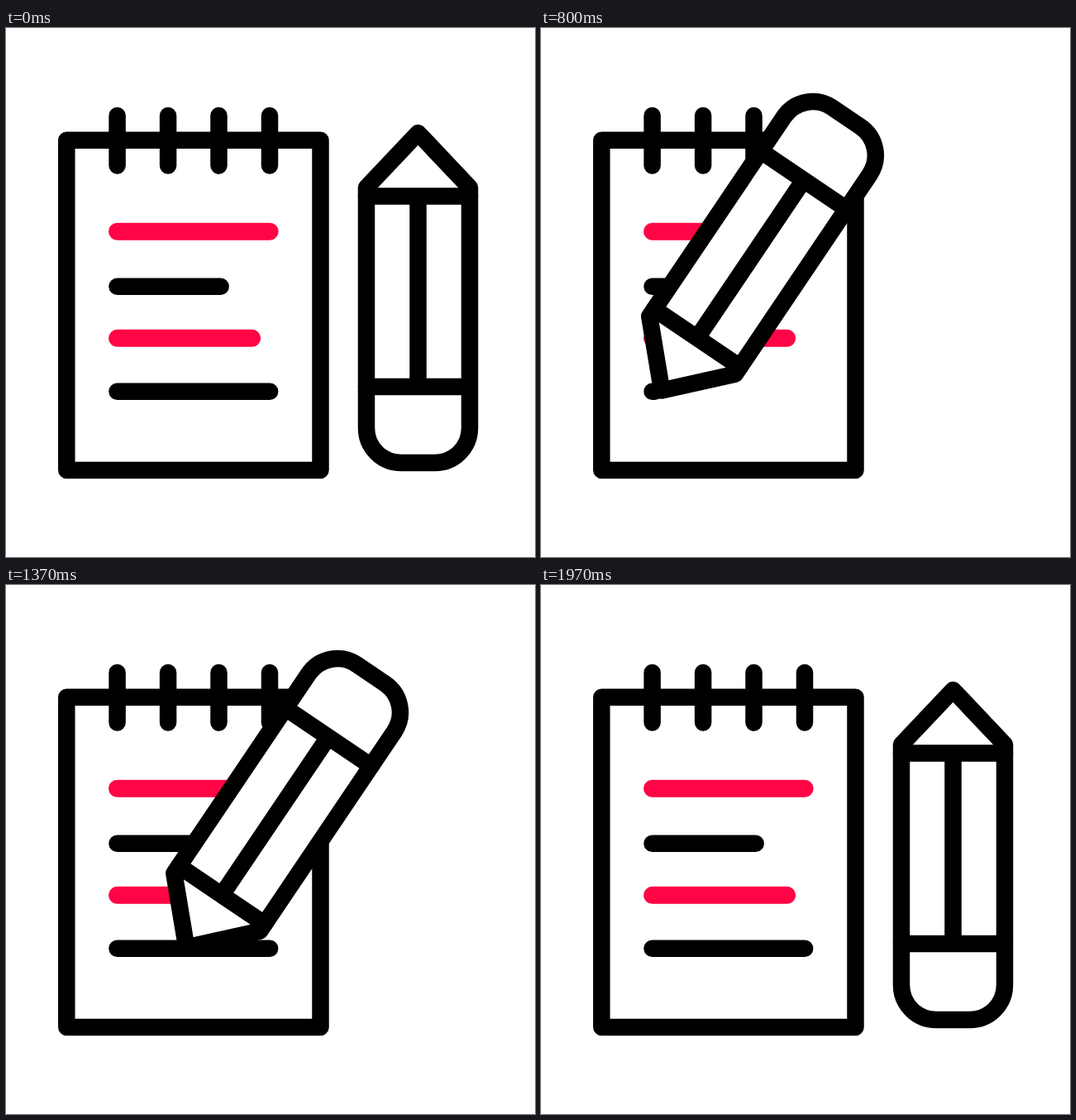
Write an HTML page that moves like this. It is 640 px wide and 640 px high and loops after 2.5 s.

```html
<!DOCTYPE html>
<html lang="en">
<head>
<meta charset="utf-8">
<title>Notepad and pencil</title>
<style>
  html, body { margin: 0; width: 100%; height: 100%; overflow: hidden; background: #fff; }
  svg { display: block; width: 100%; height: 100%; }
  path { fill: none; stroke: #000; stroke-width: 20.5; stroke-linecap: round; stroke-linejoin: round; }
  .red { stroke: #ff0546; stroke-width: 21; }
  .solid { fill: #fff; }
</style>
</head>
<body>
<svg viewBox="0 0 640 640">
  <path class="solid" d="M73.3 135.8H380.5V535H73.3Z"/>
  <path d="M134.6 106V166.5M196.1 106V166.5M257.5 106V166.5M319 106V166.5"/>
  <path class="red" d="M134.5 246.2H319.2M134.5 375.3H297.7"/>
  <path d="M134.5 312.7H259.7"/>
  <path id="line"/>
  <g id="pencil">
    <path class="solid" d="M-62.5 -133L0 -199L62.5 -133V158A42 42 0 0 1 20.5 200H-20.5A42 42 0 0 1 -62.5 158Z"/>
    <path d="M-62.5 -122.5H62.5M-62.5 108H62.5M0 -122.5V108"/>
  </g>
</svg>
<script>
  const LOOP = 2500, REST = 59, TURN = -146;
  const home = { x: 498.5, y: 326 }, page = { x: 253, y: 273.5 }, reach = 113;
  const line = document.getElementById('line');
  const pencil = document.getElementById('pencil');

  const span = (n, from, to) => Math.min(1, Math.max(0, (n - from) / (to - from)));
  const smooth = t => t * t * (3 - 2 * t);

  // Bezier easing with flat ends, handles at a and b
  function ease(t, a, b) {
    let lo = 0, hi = 1;
    for (let i = 0; i < 30; i++) {
      const s = (lo + hi) / 2, r = 1 - s;
      if (3 * r * r * s * a + 3 * r * s * s * b + s * s * s < t) lo = s; else hi = s;
    }
    return smooth(lo);
  }

  // n counts steps of 1/30 s
  function draw(n) {
    if (n >= REST) n = 0;
    const arrive = span(n, 9, 21), leave = span(n, 48.2, REST);
    const there = ease(arrive, .3, .47) - ease(leave, .5, .79);
    const write = smooth(span(n, 22.3, 36.6)) - smooth(span(n, 36.6, 48.2));
    const x = home.x + (page.x - home.x) * there + reach * write;
    const y = home.y + (page.y - home.y) * there;
    pencil.setAttribute('transform', `translate(${x} ${y}) rotate(${TURN * (arrive - leave)})`);

    const erased = smooth(span(n, 12.3, 25));
    const written = 1 - (1 - span(n, 25, 35)) ** 1.5;
    const length = 184.7 * (1 - erased + written);
    line.setAttribute('d', length > .5 ? `M134.5 439.7h${length}` : '');
  }

  const start = performance.now();
  function tick() {
    const t = (performance.now() - start) % LOOP;
    draw(Math.floor(t * .03 + .15));
    requestAnimationFrame(tick);
  }
  tick();
</script>
</body>
</html>
```
